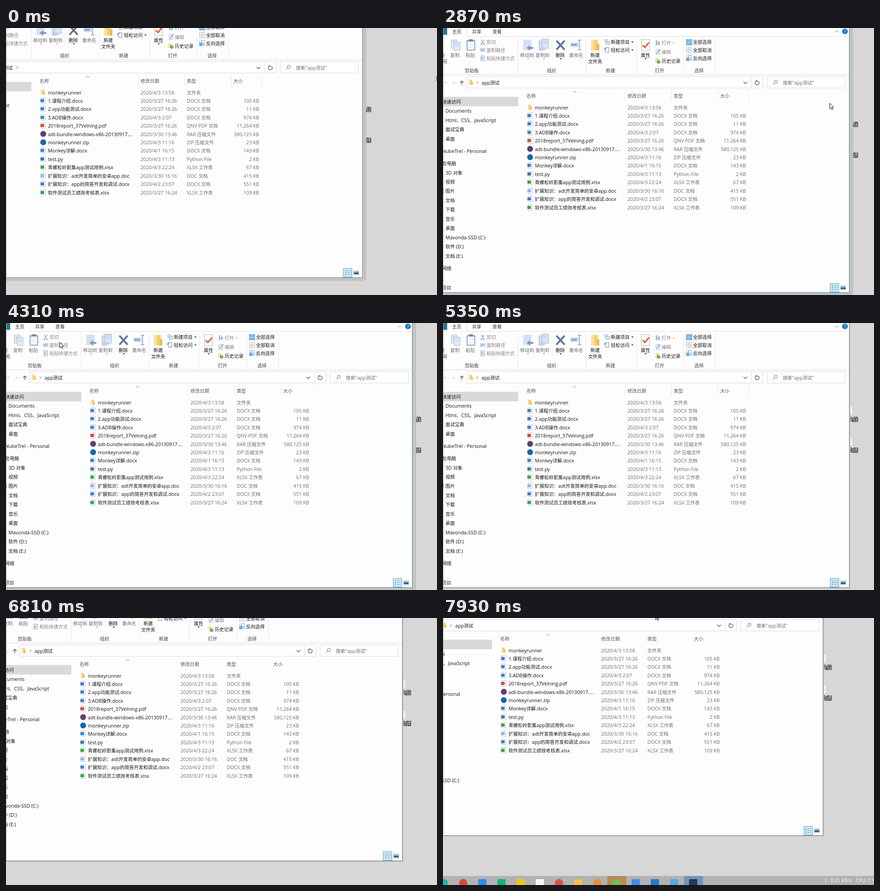
Animation, 950 px wide and 590 px high, one loop 8 s. Source, as an HTML page:

```html
<!DOCTYPE html>
<html lang="zh-CN">
<head>
<meta charset="utf-8">
<title>File manager</title>
<style>
html, body { margin: 0; width: 100%; height: 100%; overflow: hidden; background: #d7d7d7; }
svg { display: block; }
text { font: 10.7px "Open Sans", "Noto Sans", "Noto Sans CJK SC", sans-serif; white-space: pre; }
.cjk { font-size: 10.3px; }
.desk text { fill: #fff; stroke: #222; stroke-width: 1.8px; paint-order: stroke; }
.shade { fill: #c2c2c2; }
</style>
</head>
<body>
<svg id="stage" width="950" height="590" viewBox="0 0 950 590"></svg>
<script>
const LOOP = 8000;
const INK = '#151515', GREY = '#6d6d6d', DIM = '#858585';

// ---- drawing helpers ----
const rect = (x, y, w, h, fill, more = '') =>
  `<rect x="${x}" y="${y}" width="${w}" height="${h}" fill="${fill}" ${more}/>`;
const box = (x, y, w, h, stroke, fill = 'none') =>
  rect(x + .5, y + .5, w - 1, h - 1, fill, `stroke="${stroke}"`);
const disc = (x, y, r, fill) => `<circle cx="${x}" cy="${y}" r="${r}" fill="${fill}"/>`;
const line = (d, stroke, w = 1) => `<path d="${d}" fill="none" stroke="${stroke}" stroke-width="${w}"/>`;
const shape = (d, fill) => `<path d="${d}" fill="${fill}"/>`;
const text = (x, y, s, fill = INK, more = '') =>
  `<text x="${x}" y="${y + 4}" fill="${fill}" ${more}>` +
  s.replace(/[\u3000-\uffef]+/g, '<tspan class="cjk">$&</tspan>') + '</text>';
const down = (x, y, fill = INK) => shape(`M${x - 2} ${y - 1}h5l-2.5 2.5z`, fill);
const chevron = (x, y, w, h, stroke, lw = 1.1) => line(`M${x - w} ${y - h / 2}l${w} ${h}l${w} ${-h}`, stroke, lw);

// ---- icons, placed by centre ----
const folder = (x, y, s = 1) => `<g transform="translate(${x} ${y}) scale(${s})">` +
  rect(-4, -5.5, 7, 11, '#f4cf66') + rect(-4, -5.5, 3, 11, '#fbe09a') + rect(2, -1, 2.5, 6.5, '#e9b94a') + '</g>';
const page = (x, y, fill) => box(x - 4, y - 7, 10, 13, '#b9c2cc', '#fff') + rect(x - 5, y - 4, 8, 7, fill, 'rx="1"');
const badge = (x, y, fill) => disc(x, y, 6.5, fill);
const sheet = (x, y, w, h, fill = '#e6eef8') => box(x, y, w, h, '#9db7d6', fill) +
  [3, 6, 9].filter(d => d < h - 2).map(d => rect(x + 2, y + d, w - 4, 1, '#b4cae4')).join('');
const screen = (x, y) => rect(x - 6, y - 5, 12, 9, '#1b87d8') + rect(x - 6, y + 3, 12, 2, '#0d62a6');
const drive = (x, y) => shape(`M${x - 6} ${y}l9 1l3 2v2h-4l-8 -2z`, '#777') + rect(x + 2, y + 3, 3, 1, '#5cc46a');
const tiles = (x, y, fill, edge) => [[-6, -6], [1, -6], [-6, 1], [1, 1]]
  .map(([a, b]) => box(x + a, y + b, 6, 6, edge, fill)).join('');

// ---- content ----
const files = [
  ['monkeyrunner', '4/3 13:58', '文件夹', '', folder],
  ['1.课程介绍.docx', '3/27 16:26', 'DOCX 文档', '105', '#3f7fd8'],
  ['2.app功能测试.docx', '3/27 16:26', 'DOCX 文档', '11', '#3f7fd8'],
  ['3.ADB操作.docx', '4/3 2:07', 'DOCX 文档', '974', '#3f7fd8'],
  ['2018report_37Velning.pdf', '3/27 16:26', 'QNV PDF 文档', '11,264', '#dc4640'],
  ['adt-bundle-windows-x86-20130917....', '3/30 13:46', 'RAR 压缩文件', '580,125', (x, y) => badge(x + 1, y, '#5d3f72')],
  ['monkeyrunner.zip', '4/3 11:16', 'ZIP 压缩文件', '23', (x, y) => badge(x + 1, y, '#1467a8')],
  ['Monkey详解.docx', '4/1 16:15', 'DOCX 文档', '143', '#3f7fd8'],
  ['test.py', '4/3 11:13', 'Python File', '2', '#3c78a8'],
  ['青螺松岭影集app测试用例.xlsx', '4/3 22:24', 'XLSX 工作表', '67', '#36a846'],
  ['扩展知识：adt开发简单的安卓app.doc', '3/30 16:16', 'DOC 文档', '415', '#8db8ee'],
  ['扩展知识：app的简答开发和调试.docx', '4/2 23:07', 'DOCX 文档', '551', '#3f7fd8'],
  ['软件测试员工绩效考核表.xlsx', '3/27 16:24', 'XLSX 工作表', '109', '#36a846'],
];

const places = [
  ['快速访问', 162.5, (x, y) => shape(`M${x} ${y - 6}l2 4h4l-3 3l1 5l-4 -3l-4 3l1 -5l-3 -3h4z`, '#2f8fdc'), 1],
  ['Documents', 183, folder], ['Html、CSS、JavaScript', 203.5, folder], ['面试宝典', 224, folder],
  ['桌面', 244.5, screen],
  ['NubeTrel - Personal', 272, (x, y) => disc(x, y, 5.5, '#1273c4'), 1],
  ['此电脑', 299, screen, 1],
  ['3D 对象', 319.5, (x, y) => rect(x - 5, y - 5, 10, 10, '#2fb4cf') + rect(x, y - 5, 5, 10, '#1785a8')],
  ['视频', 340, (x, y) => rect(x - 6, y - 6, 12, 12, '#3d4450') + rect(x - 3, y - 5, 6, 4, '#8fa5c8') + rect(x - 3, y + 1, 6, 4, '#8fa5c8')],
  ['图片', 360, (x, y) => box(x - 6, y - 5, 13, 10, '#9aa6b2', '#fff') + rect(x - 4, y - 3, 9, 3, '#7cc0ee') + rect(x - 4, y, 9, 3, '#37699c')],
  ['文档', 381, (x, y) => sheet(x - 5, y - 6, 10, 12)],
  ['下载', 401, (x, y) => shape(`M${x - 2} ${y - 6}h4v5h4l-6 6l-6 -6h4z`, '#2a82da')],
  ['音乐', 422, (x, y) => line(`M${x} ${y + 3}v-9q1 3 4 4`, '#1c8ce0', 1.6) + disc(x - 2, y + 4, 2.4, '#1c8ce0')],
  ['桌面', 442, screen],
  ['Mavonda-SSD (C:)', 463, (x, y) => drive(x, y) + rect(x - 6, y - 5, 6, 5, '#2a9be8')],
  ['软件 (D:)', 483, drive], ['文档 (E:)', 504, drive],
  ['网络', 531, (x, y) => screen(x, y) + disc(x - 2, y + 2, 3.5, '#55a7e4'), 1],
];

function ribbon() {
  let s = rect(-40, -40, 935, 58, '#fff') + rect(-40, 18, 935, 1, '#dcdddf') +
    rect(9, 0, 43, 20, '#fdfdfd') + rect(-20, 0, 29, 15, '#2b738c') + rect(9, 0, 1, 18, '#dcdddf') + rect(52, 0, 1, 18, '#dcdddf');
  s += [[20, '主页'], [64, '共享'], [109, '查看']].map(([x, t]) => text(x, 7.5, t, '#333')).join('');
  s += line('M864 10l4 -4l4 4', '#777') + disc(886, 7.5, 6.2, '#1675c8') +
    text(886, 7.5, '?', '#fff', 'text-anchor="middle" font-weight="700"');
  s += [165, 315, 426, 530, 600].map(x => rect(x, 22, 1, 79, '#e6e6e6')).join('') + rect(240, 24, 1, 48, '#ececec');
  s += rect(-40, 103, 935, 1, '#d8dadc');
  const labels = [
    [-17, 60, '快速', INK], [-12, 74, '访问', INK], [16, 60, '复制', GREY], [50, 60, '粘贴', GREY],
    [96, 31, '剪切', DIM], [96, 48.5, '复制路径', DIM], [96, 66.5, '粘贴快捷方式', DIM],
    [170, 60, '移动到', GREY], [204, 60, '复制到', GREY], [248, 60, '删除', INK], [278, 60, '重命名', GREY],
    [325, 60, '新建', INK], [320, 74, '文件夹', INK], [370, 31, '新建项目', INK], [370, 48.5, '轻松访问', INK],
    [436, 60, '属性', INK], [482, 33, '打开', DIM], [482, 53, '编辑', DIM], [482, 72.5, '历史记录', INK],
    [551, 31, '全部选择', INK], [551, 48.5, '全部取消', INK], [551, 66.5, '反向选择', INK],
    [48, 94, '剪贴板', '#444'], [229, 94, '组织', '#444'], [359, 94, '新建', '#444'], [467, 94, '打开', '#444'], [554, 94, '选择', '#444'],
  ];
  s += labels.map(l => text(...l)).join('');
  s += down(187, 68, '#999') + down(222, 68, '#999') + down(259, 68) + down(446, 68) +
    down(417, 31) + down(417, 48.5) + down(508, 33, '#aaa');
  // clipboard
  s += sheet(18, 26, 13, 19) + sheet(24, 31, 14, 19) + rect(52, 27, 19, 23, '#8ea9cf', 'rx="1"') +
    rect(54, 30, 15, 18, '#f1f5fb') + rect(57, 25, 9, 4, '#6d86ad');
  s += line('M84 26l5 8M91 26l-5 8', '#7f93b5', 1.3) + disc(84.5, 36, 1.7, '#8ea6c6') + disc(90, 36, 1.7, '#8ea6c6');
  s += box(82, 45, 11, 7, '#9db2cf', '#dbe5f2') + line('M84 50l2 -3l2 3l2 -3', '#6b83a8') +
    box(83, 61, 9, 12, '#8da2c4', '#eaf0f8') + line('M86 70v-4h3', '#4d77ba', 1.2);
  // organise
  s += rect(177, 26, 18, 23, '#d3e1f3') + shape('M184 44l8 -6v4h7v4h-7v4z', '#8498bd') +
    sheet(211, 28, 15, 20, '#d9e6f5') + sheet(217, 24, 16, 21, '#d9e6f5') + rect(211, 42, 11, 8, '#bed2ea');
  s += line('M250 28l18 20M268 28l-18 20', '#5f7198', 4) + rect(281, 32, 18, 10, '#c9dcf1') +
    rect(283, 35, 12, 4, '#8da5c9') + line('M297 27h8M301 27v21M297 48h8', '#8499bd', 1.6);
  // create and open
  s += folder(335, 38, 2.1) + sheet(356, 25, 8, 7) + sheet(359, 29, 9, 8, '#dce9d2') +
    box(358, 43, 8, 11, '#6d87a8', '#fff') + line('M356 47l4 -4M356 45v4', '#3f80c0', 1.3);
  s += box(437, 25, 19, 26, '#a9b4c4', '#fbfcfe') + line('M440 38l5 5l9 -11', '#e45b2c', 3);
  s += rect(469, 27, 3, 11, '#9fb3d0') + rect(473, 30, 5, 8, '#bccbe0') + line('M476 36v-6', '#7894bd', 1.4);
  s += box(469, 47, 9, 12, '#a9bad0', '#eef3fa') + line('M471 56l8 -9', '#7c96bd', 1.8) +
    folder(472, 72, .9) + disc(475.5, 75, 3.6, '#3ba24c') + line('M475.5 73v2.5h2', '#fff');
  // select
  s += tiles(542, 31, '#8cc4f0', '#3e8fd2') + tiles(542, 48.5, '#fff', '#bcbcbc') +
    rect(536, 66, 7, 7, '#69aee6') + box(541, 60, 7, 7, '#69aee6', '#fff') + box(536, 61, 5, 5, '#b7b7b7', '#fff') + rect(544, 68, 4, 4, '#8cc4f0');
  return s;
}

function addressBar() {
  return line('M-2 120.5h10M5 117.5l3 3l-3 3', '#c4c4c4') + chevron(24, 121, 2.5, 2.5, '#c4c4c4') +
    line('M41.5 126v-9M37.5 121l4 -4l4 4', '#555', 1.3) +
    box(52, 107, 654, 26, '#d9d9d9', '#fff') + rect(679, 107, 1, 26, '#d9d9d9') +
    folder(61, 120) + line('M74 117.5l3 3l-3 3', '#555') + text(85, 120.5, 'app测试') +
    `<g id="crumb">${line('M133 117.5l3 3l-3 3', '#555')}</g>` +
    chevron(666.5, 121, 4, 4, '#555', 1.3) +
    line('M690 117.300a4.500 4.500 0 1 0 5 0M689 116.500h3.500v3.500', '#555', 1.3) +
    box(714, 107, 173, 26, '#d9d9d9', '#fff') +
    line('M730.8 121.5l-4 4M737 118.6a3.4 3.4 0 1 1 -6.8 0a3.4 3.4 0 1 1 6.8 0', '#666') +
    text(749, 120.5, '搜索"app测试"', GREY);
}

function fileList() {
  let s = [[184, '名称'], [406.5, '修改日期'], [508.5, '类型'], [611, '大小']]
    .map(([x, t]) => text(x, 149.5, t, '#4c5663')).join('');
  s += `<g id="columns">${[401, 503, 606, 674].map(x => rect(x, 137, 1, 24, '#e5e5e5')).join('')}</g>` +
    line('M286.5 142.5l3.5 -3l3.5 3', '#777');
  files.forEach(([name, date, type, size, icon], i) => {
    const y = 175.5 + 18.42 * i;
    s += (icon.call ? icon(191, y - .5) : page(191, Math.round(y), icon)) + text(202.5, y, name) +
      text(406.5, y, '2020/' + date, GREY) + text(508.5, y, type, GREY);
    if (size) s += text(668, y, size + ' KB', GREY, 'text-anchor="end"');
  });
  return s;
}

function sidebar() {
  return rect(-40, 152, 206, 21, '#d9d9d9') +
    places.map(([t, y, icon, top]) => icon(top ? -11 : -5, y) + text(top ? -2 : 5.5, y, t)).join('') +
    text(18, 574, '13 个项目', '#333', 'text-anchor="end"');
}

function viewButtons() {
  return box(853, 564, 20, 20, '#45a5d6', '#cdeaf8') +
    [569, 573, 577].map(y => rect(857, y, 3, 2, '#7fa3bd') + rect(862, y, 4, 1, '#888') + rect(867, y, 3, 1, '#888')).join('') +
    box(876, 569, 12, 10, '#a8b0b8', '#fff') + rect(877, 571, 10, 3, '#6aaade') + rect(877, 574, 10, 3, '#2f4e6c');
}

function desktop() {
  const item = (y, t) => rect(894, y - 28, 8, 17, '#f1f1ee') + rect(897, y - 26, 1, 15, '#d5c4ae') +
    text(914.5, y, t, '#fff', 'text-anchor="end"');
  return `<g class="desk">${item(212.5, '项目实战')}${item(281, '自学白嫖')}</g>` + rect(1058, 140, 12, 10, '#6f8fc4');
}

function taskbar() {
  const apps = ['c#f4f4f4', 'c#22b5b0', 'c#d94a3d', 's#2f8ceb', 's#14b37f', 's#f4c51d', 's#f6f6f6', 'c#df5148',
    's#f2bf4c', 'c#e58c45', 'c#70c34c', 's#3c8eea', 's#1d7fcb', 's#56a8de', 's#2a3268'];
  let s = rect(-60, 674, 1160, 60, '#b2b2b2') + rect(420, 674, 42, 60, '#ba8a56') + rect(589, 674, 42, 60, '#7195bb');
  apps.forEach((a, i) => {
    const x = 18 + 42.25 * i, fill = a.slice(1);
    s += a[0] === 'c' ? disc(x, 689.5, i ? 9 : 6, fill) : rect(x - 9, 681, 18, 17, fill, 'rx="2"');
  });
  return s + '<g id="speed"></g>' + text(968, 684, 'CPU: 7 %', '#fff') + text(896, 698, '↑: 0.09 KB/s', '#fff');
}

document.getElementById('stage').innerHTML =
  `<g id="world">${desktop()}${taskbar()}
    <path id="glow" class="shade" d="M895 -40h9v626q0 6 -6 6h-940v-8h937z"/>
    <path class="shade" d="M895 -40h3v627h-940v-3h937z"/>
    ${rect(-60, -60, 955, 644, '#fdfdfd')}${ribbon()}${addressBar()}${sidebar()}${fileList()}${viewButtons()}
    <path id="edge" d="M895.5 -40V584.5H-40" fill="none"/></g>
  ${rect(0, 0, 1, 590, '#a9a9a9', 'id="side"')}
  <path id="outline" fill="none" stroke="#222" stroke-width="2"/>
  <path id="pointer" d="M.5 .5v12l2.800 -2.600l2 4.600l2 -.9l-2 -4.400h3.800z" fill="#fff" stroke="#111"/>`;

// ---- motion: [time, x, y], each pose held until the next ----
const pan = [
  [0, -110, -33], [1770, 0, 0],
  [5470, -34, 0], [5610, -82, 0], [5750, -107, 0], [5890, -98, 0], [6020, -80, 0], [6150, -62, 0], [6290, -50, 0],
  [6660, -42, -14], [6800, -22, -48], [6950, 2, -80], [7090, 17, -97], [7240, 20, -100], [7660, 18, -99],
  [7780, -22, -102], [7930, -58, -104],
];
const pointerPath = [
  [400, 751, -5], [540, 736, 28], [680, 708, 83], [820, 686, 38], [950],
  [2080, 830, 4], [2200, 829, 22], [2350, 832, 42], [2480, 838, 66], [2620, 843, 98], [2750, 848, 132], [2870, 852, 166], [3020, 843, 232],
  [3170, 808, 306], [3310, 742, 362], [3450, 650, 368], [3590, 545, 320], [3730, 440, 252], [3880, 340, 178], [4020, 250, 110], [4160, 182, 64],
  [4310, 118, 42], [4460, 92, 24], [4610, 74, 6], [4760],
  [7930, 468, -9],
];
const outlinePath = [[1380, 922, 587], [1500, 888, 583], [1620, 848, 577], [1770]];
const activity = [[0, 'grey'], [1380, ''], [2220, 'blue'], [5350, '']];

const at = (track, t) => track.findLast(k => k[0] <= t) || [];
const el = Object.fromEntries(['world', 'glow', 'edge', 'side', 'outline', 'pointer', 'crumb', 'columns', 'speed']
  .map(id => [id, document.getElementById(id)]));
const show = (node, on) => node.setAttribute('visibility', on ? 'visible' : 'hidden');
const start = performance.now();
let rate = '';

function draw() {
  const t = (performance.now() - start) % LOOP;
  const [, dx, dy] = at(pan, t);
  el.world.setAttribute('transform', `translate(${dx} ${dy})`);
  el.side.setAttribute('height', 585 + dy);

  const [, px, py] = at(pointerPath, t);
  show(el.pointer, px !== undefined);
  if (px !== undefined) el.pointer.setAttribute('transform', `translate(${px} ${py})`);

  const [, ox, oy] = at(outlinePath, t);
  show(el.outline, ox !== undefined);
  if (ox !== undefined) el.outline.setAttribute('d', `M${ox} -5V${oy}H-5`);

  const mode = at(activity, t)[1];
  show(el.glow, mode);
  el.edge.setAttribute('stroke', mode === 'blue' ? '#4388a6' : '#808080');
  show(el.crumb, t < 1380);
  show(el.columns, t < 6660);

  const now = t < 7780 ? '0.38' : '0.21';
  if (now !== rate) el.speed.innerHTML = text(896, 684, `↓: ${rate = now} KB/s`, '#fff');
  requestAnimationFrame(draw);
}
draw();
</script>
</body>
</html>
```
